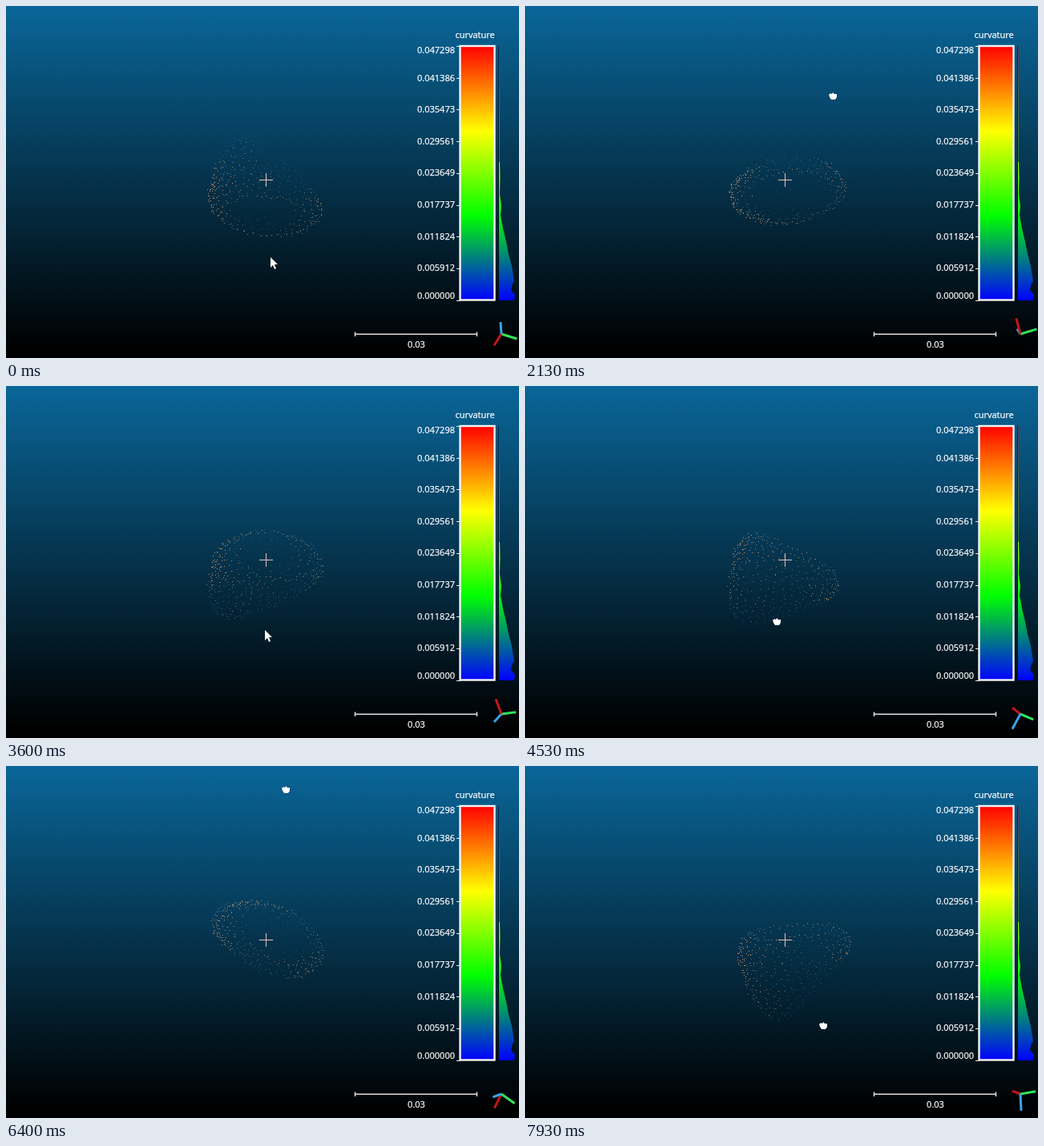
An HTML page with a canvas that plays this animation: 640 px wide and 440 px high, repeating every 8 s.

```html
<!DOCTYPE html>
<html lang="en">
<head>
<meta charset="utf-8">
<title>Curvature point cloud</title>
<style>
  html, body { margin: 0; width: 640px; height: 440px; overflow: hidden; background: #000; }
  canvas, svg { position: absolute; left: 0; top: 0; }
  text { font: 11px "Open Sans", "Noto Sans", sans-serif; fill: #fff; stroke: #fff; stroke-width: .25px; }
</style>
</head>
<body>
<canvas id="view" width="640" height="440"></canvas>
<svg width="640" height="440">
  <defs>
    <linearGradient id="ramp" gradientUnits="userSpaceOnUse" x1="0" y1="368" x2="0" y2="50">
      <stop offset="0" stop-color="#00f"/>
      <stop offset=".333" stop-color="#0f0"/>
      <stop offset=".667" stop-color="#ff0"/>
      <stop offset="1" stop-color="#f00"/>
    </linearGradient>
  </defs>
  <text x="585" y="40" text-anchor="middle">curvature</text>
  <path d="M615 195V368H634L635 361 630 355 632 347 634 344 631 325 627 310 624 295 620 278 617 262 618 250 616 235 616.5 215 616 195Z" fill="url(#ramp)"/>
  <path d="M615 50H616V195H615Z" fill="url(#ramp)" fill-opacity=".3"/>
  <path d="M614.5 50V368" stroke="#09131c" stroke-opacity=".75"/>
  <rect x="566.5" y="50" width="43" height="317.5" fill="url(#ramp)" stroke="#f4f4f4" stroke-width="2.4"/>
  <g id="labels"></g>
  <path d="M435.5 407.5V413M435.5 410.3H587.5M587.5 407.5V413" fill="none" stroke="#e0e0e0" stroke-width="1.5"/>
  <text x="512" y="427" text-anchor="middle">0.03</text>
  <path d="M316 217.5H333M324.5 209V226" stroke="#d8c8c0"/>
</svg>
<script>
const LOOP = 8000;
const ctx = document.getElementById('view').getContext('2d');

const scale = [['0.047298', 55], ['0.041386', 90], ['0.035473', 129], ['0.029561', 169],
  ['0.023649', 208], ['0.017737', 248], ['0.011824', 288], ['0.005912', 327], ['0.000000', 362]];
document.getElementById('labels').innerHTML = scale.map(([value, y], i) => {
  const tick = Math.round(50 + i * 39.7) + .5;
  return `<text x="560" y="${y + 4}" text-anchor="end">${value}</text>` +
    `<path d="M562 ${tick}H567" stroke="#eee"/>`;
}).join('');

// Camera rows (screen right, screen up) and screen shift of the cloud
const poses = [
  { right: [-9, 19, -1], up: [-15, -7, 16], shift: [-2, -16] },
  { right: [-4, 20, -1], up: [-1, 1, 21], shift: [0, -4] },
  { right: [-5, 20, -4], up: [19, 7, 6], shift: [0, -8] },
  { right: [-7, 18, -9], up: [19, 2, -10], shift: [-5, -14] },
  { right: [-10, 16, -10], up: [8, -7, -19], shift: [-7, -28] },
  { right: [-9, 17, -11], up: [-18, -12, -4], shift: [-3, -2] },
  { right: [-10, 19, 1], up: [4, 3, -21], shift: [12, -30] }
];
// time, pose
const turn = [[0, 0], [150, 0], [930, 1], [1200, 1.35], [1700, 1.4], [2130, 2],
  [2500, 2.75], [3600, 3], [3800, 3], [4530, 4], [6400, 5], [7930, 6], [8000, 6]];
// time, x, y, dragging
const pointer = [[0, 333, 321, 0], [150, 334, 316, 1], [930, 365, 137, 1],
  [1200, 368, 62, 0], [1700, 376, 285, 1], [2130, 384, 113, 1], [2450, 386, 66, 0],
  [2800, 345, 270, 0], [3600, 326, 312, 0], [3800, 322, 335, 1],
  [4530, 314, 295, 1], [6400, 349, 30, 1], [7930, 372, 325, 1], [8000, 372, 325, 1]];

const lerp = (a, b, k) => a + (b - a) * k;
const mix = (a, b, k) => a.map((v, i) => lerp(v, b[i], k));
const dot = (a, b) => a[0] * b[0] + a[1] * b[1] + a[2] * b[2];
const unit = a => { const n = Math.hypot(...a); return a.map(v => v / n); };
const cross = (a, b) => [a[1] * b[2] - a[2] * b[1], a[2] * b[0] - a[0] * b[2], a[0] * b[1] - a[1] * b[0]];

function sample(table, t) {
  let i = 0;
  while (i < table.length - 2 && table[i + 1][0] <= t) i++;
  const a = table[i], b = table[i + 1];
  return { value: mix(a, b, (t - a[0]) / (b[0] - a[0])), from: a };
}

function camera(t) {
  const p = sample(turn, t).value[1];
  const i = Math.min(Math.floor(p), poses.length - 2);
  const a = poses[i], b = poses[i + 1], k = p - i;
  const right = unit(mix(a.right, b.right, k));
  const rawUp = mix(a.up, b.up, k);
  const lean = dot(rawUp, right);
  const up = unit(rawUp.map((v, j) => v - lean * right[j]));
  return { right, up, toward: cross(right, up), shift: mix(a.shift, b.shift, k) };
}

let seed = 7;
const random = () => (seed = seed * 16807 % 2147483647) / 2147483647;
const GOLDEN = Math.PI * (3 - Math.sqrt(5));
const FLAT = [16, 72, 122], MIDDLE = [85, 125, 125], CURVED = [214, 152, 98];
const points = [];

function addPoint(x, y, z, curvature) {
  const c = Math.max(0, Math.min(1, curvature));
  const jitter = () => (random() - .5) * 5;
  const rgb = c < .5 ? mix(FLAT, MIDDLE, c * 2) : mix(MIDDLE, CURVED, c * 2 - 1);
  points.push({
    at: [x + jitter() - .12 * y, y + jitter(), z + jitter()],
    color: `rgb(${rgb.map(Math.round)})`,
    alpha: .6 + .3 * c
  });
}

function buildCloud() {
  // Rounded base below, tapering into an offset head above
  const baseCount = 190, upperCount = 300, rimCount = 50;
  for (let i = 0; i < baseCount; i++) {
    const w = .85 * (i + .5) / baseCount, a = i * GOLDEN;
    const r = Math.sqrt(1 - w ** 5), y = 70 * r * Math.sin(a);
    addPoint(42 * r * Math.cos(a), y, -10 - 38 * w, .15 + Math.abs(y - 15) / 90 + .4 * (random() - .5));
  }
  for (let i = 0; i < upperCount; i++) {
    const s = ((i + .5) / upperCount) ** 1.3, a = i * GOLDEN;
    const r = Math.sqrt(1 - s ** 4);
    const x = lerp(0, -25, s) + lerp(42, 25, s) * r * Math.cos(a);
    const y = lerp(0, -40, s) + lerp(70, 24, s) * r * Math.sin(a);
    const patch = .35 * Math.sin(x * .1 + 1) + .25 * Math.sin(y * .12);
    addPoint(x, y, -10 + 72 * s, .3 + Math.abs(y - 15) / 110 - .7 * s + patch + .4 * (random() - .5));
  }
  for (let i = 0; i < rimCount; i++) {
    const a = i / rimCount * 2 * Math.PI;
    addPoint(34 * Math.cos(a), 58 * Math.sin(a), -42, .6 + .4 * Math.sin(2 * a + 1));
  }
}

function drawBackground() {
  const sky = ctx.createLinearGradient(0, 0, 0, 430);
  sky.addColorStop(0, '#0a6699');
  sky.addColorStop(1, '#000');
  ctx.fillStyle = sky;
  ctx.fillRect(0, 0, 640, 440);
}

function drawCloud(cam) {
  for (const p of points) {
    ctx.globalAlpha = p.alpha;
    ctx.fillStyle = p.color;
    ctx.fillRect(Math.round(324 + cam.shift[0] + dot(cam.right, p.at)),
      Math.round(217 - cam.shift[1] - dot(cam.up, p.at)), 1, 1);
  }
  ctx.globalAlpha = 1;
}

function drawAxes(cam) {
  const colors = ['#c4161a', '#30e45a', '#3aa4e8'];
  ctx.lineWidth = 3;
  [0, 1, 2].sort((a, b) => cam.toward[a] - cam.toward[b]).forEach(i => {
    ctx.strokeStyle = colors[i];
    ctx.beginPath();
    ctx.moveTo(618, 410);
    ctx.lineTo(618 + 21.5 * cam.right[i], 410 - 21.5 * cam.up[i]);
    ctx.stroke();
  });
}

const arrow = new Path2D('M-3-7V6L0 3 2 8 4 7 2 2H6Z');
const fist = new Path2D('M-5-2L-3-4-1-3 0-5 2-3 5-3V1L3 4H-2L-4 1Z');

function drawPointer(t) {
  const { value, from } = sample(pointer, t);
  ctx.save();
  ctx.translate(Math.round(value[1]), Math.round(value[2]));
  ctx.fillStyle = '#fff';
  ctx.strokeStyle = 'rgba(0,0,0,.45)';
  ctx.lineWidth = 1;
  const shape = from[3] ? fist : arrow;
  ctx.stroke(shape);
  ctx.fill(shape);
  ctx.restore();
}

function draw(now) {
  const t = now % LOOP, cam = camera(t);
  drawBackground();
  drawCloud(cam);
  drawAxes(cam);
  drawPointer(t);
}

buildCloud();
let start;
function tick(now) {
  start ??= now;
  draw(now - start);
  requestAnimationFrame(tick);
}
draw(0);
requestAnimationFrame(tick);
</script>
</body>
</html>
```
